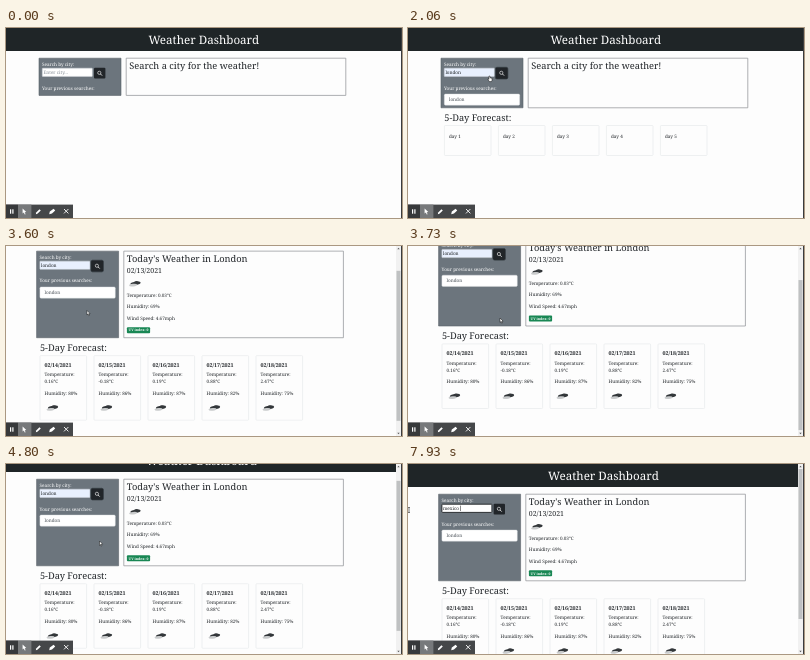
These frames come from a looping animation (396x190 px, 8 s). An HTML page with a canvas:

```html
<!DOCTYPE html>
<html lang="en">
<head>
<meta charset="utf-8">
<title>Weather Dashboard</title>
<style>
  html, body { margin: 0; width: 100%; height: 100%; overflow: hidden; background: #fdfdfd; }
  canvas { display: block; width: 396px; height: 190px; }
</style>
</head>
<body>
<canvas id="stage"></canvas>
<script>
const W = 396, H = 190, LOOP = 8000, STEP = 1000 / 15;
const INK = '#212529', SERIF = '"Noto Serif", serif', BODY = 4.64;
const canvas = document.getElementById('stage');
const ctx = canvas.getContext('2d');
const ratio = window.devicePixelRatio || 1;
canvas.width = W * ratio;
canvas.height = H * ratio;

const forecast = [
  ['02/14/2021', '0.16', 80], ['02/15/2021', '-0.18', 86], ['02/16/2021', '0.19', 87],
  ['02/17/2021', '0.88', 82], ['02/18/2021', '2.47', 75]
];

// time, x, y, shape from then on
const pointer = [
  [200, 180, 50, 'arrow'], [333, 44, 45, 'beam'], [1200, 44, 45, 'beam'],
  [1400, 52, 55, 'arrow'], [1660, 92, 46, 'hand'], [1800, 93, 42, 'hand'],
  [1866, 93, 42, 'hand'], [2000, 86, 46, 'hand'], [2066, 81, 48, 'hand'],
  [2200, 77, 50, 'arrow'], [2860, 64, 53, 'arrow'], [3400, 64, 53, 'arrow'],
  [3730, 92, 72, 'arrow'], [4200, 93.5, 77, 'arrow'], [4933, 93.5, 77, 'arrow'],
  [5266, 53, 44, 'beam'], [5733, 53, 44, 'beam'], [6133, 1, 46, 'beam']
];
const scrollKeys = [[3400, 0], [3533, 16], [3666, 34], [3730, 36.8], [4600, 36.8], [4800, 15], [4933, 0]];
const clicks = [[330, 400, 44, 45], [1795, 1995, 93, 42], [5525, 5730, 53, 44]];
const typing = [
  [0, ''], [660, 'l'], [860, 'lo'], [1395, 'london'], [6730, 'm'], [6860, 'me'],
  [7130, 'mex'], [7330, 'mexi'], [7530, 'mexic'], [7730, 'mexico'], [7930, 'mexico ']
];

const between = (t, a, b) => t >= a && t < b;

function lastKey(keys, t) {
  let i = 0;
  while (i < keys.length - 1 && keys[i + 1][0] <= t) i++;
  return i;
}

function tween(keys, t, field) {
  const i = lastKey(keys, t), a = keys[i], b = keys[i + 1];
  if (!b || t <= a[0]) return a[field];
  return a[field] + (b[field] - a[field]) * (t - a[0]) / (b[0] - a[0]);
}

function text(str, x, y, size = BODY, color = INK, weight = 400, align = 'left') {
  ctx.font = `${weight} ${size}px ${SERIF}`;
  ctx.textAlign = align;
  ctx.fillStyle = color;
  ctx.fillText(str, x, y);
}

function rect(x, y, w, h, color) {
  ctx.fillStyle = color;
  ctx.fillRect(x, y, w, h);
}

function box(x, y, w, h, r, fill, stroke, line = 0.6) {
  ctx.beginPath();
  ctx.roundRect(x, y, w, h, r);
  if (fill) { ctx.fillStyle = fill; ctx.fill(); }
  if (stroke) { ctx.strokeStyle = stroke; ctx.lineWidth = line; ctx.stroke(); }
}

function shape(points, fill, stroke, line = 0.6) {
  ctx.beginPath();
  points.forEach(([x, y]) => ctx.lineTo(x, y));
  ctx.closePath();
  if (fill) { ctx.fillStyle = fill; ctx.fill(); }
  if (stroke) { ctx.strokeStyle = stroke; ctx.lineWidth = line; ctx.stroke(); }
}

function stroke(points, color, line) {
  ctx.beginPath();
  for (let i = 0; i < points.length; i += 2) {
    ctx.moveTo(...points[i]);
    ctx.lineTo(...points[i + 1]);
  }
  ctx.strokeStyle = color;
  ctx.lineWidth = line;
  ctx.stroke();
}

function oval(x, y, rx, ry, color, turn = 0) {
  ctx.beginPath();
  ctx.ellipse(x, y, rx, ry, turn, 0, 7);
  ctx.fillStyle = color;
  ctx.fill();
}

function ring(x, y, r, color, line) {
  ctx.beginPath();
  ctx.arc(x, y, r, 0, 7);
  ctx.strokeStyle = color;
  ctx.lineWidth = line;
  ctx.stroke();
}

function cloud(x, y) {
  oval(x + 1.4, y - 0.6, 5.2, 1.7, '#33373a', -0.16);
  oval(x + 2.4, y - 1.4, 2.4, 1.6, '#33373a');
  oval(x - 1, y + 1.2, 4, 1.3, '#c9cbcc', -0.1);
}

function searchPanel(t, height) {
  box(33, 30.2, 82, height, 0, '#6c757d', '#5a6268');
  text('Search by city:', 36, 37.7, BODY, '#fff');

  const value = typing[lastKey(typing, t)][1];
  const focused = between(t, 330, 1660) || t >= 5525;
  const filled = between(t, 1395, 6725);
  box(36.3, 40.2, 50, 8.2, 0.5, filled ? '#e8f0fe' : '#fff', focused ? '#1b1f22' : '#ced4da', focused ? 0.9 : 0.5);
  if (t >= 5733 && filled) {
    const from = Math.min(53, Math.max(37.5, tween(pointer, t, 1) + ox(t) * -1));
    rect(from, 41.4, 53 - from, 5.8, '#8fb8f0');
  }
  text(value || 'Enter city...', 37.4, 46, BODY, value ? INK : '#868e96');
  if (focused && !filled) {
    const caret = 37.6 + (value ? ctx.measureText(value).width : 0);
    rect(caret, 41.6, 0.5, 5.4, '#111');
  }

  if (between(t, 1795, 5525)) box(87.4, 39.3, 12.4, 11.6, 1.5, '#15191c', '#3d454b', 1);
  box(88, 39.8, 11.4, 10.6, 1, INK);
  ring(93.3, 44.8, 1.6, '#fff', 0.6);
  stroke([[94.5, 46], [96.1, 47.6]], '#fff', 0.8);

  text('Your previous searches:', 36, 61.5, BODY, '#fff');
  if (t >= 1995) {
    box(36.3, 66, 75.4, 11.2, 1.2, '#fff', '#d5d9dc', 0.4);
    text('london', 41, 73.2, BODY, '#495057');
  }
}

function today(loaded, height) {
  box(120.2, 30.2, 219.6, height, 0, '#fdfdfd', '#8b8f92', 0.7);
  if (!loaded) {
    text('Search a city for the weather!', 123.2, 41.4, 9.28);
    return;
  }
  text("Today's Weather in London", 123.2, 41.4, 9.28);
  text('02/13/2021', 123.2, 52.4, 6.96);
  cloud(130.5, 63);
  text('Temperature: 0.03°C', 123.2, 75.6);
  text('Humidity: 69%', 123.2, 87.2);
  text('Wind Speed: 4.67mph', 123.2, 98.8);
  box(123.3, 106.3, 23.2, 5.9, 1, '#198754');
  text('UV index: 0', 134.9, 110.5, 3.48, '#fff', 700, 'center');
}

function days(loaded, y) {
  text('5-Day Forecast:', 36.3, y + 93, 9.28);
  forecast.forEach(([date, temp, humidity], i) => {
    const x = 36.4 + i * 54;
    box(x, y + 97.5, 46.6, loaded ? 64.6 : 30, 0.8, '#fdfdfd', '#dfe2e4', 0.5);
    if (!loaded) {
      text('day ' + (i + 1), x + 4.6, y + 109.8);
      return;
    }
    text(date, x + 4.6, y + 108.6, 5.35, INK, 700);
    text('Temperature:', x + 4.6, y + 118.2);
    text(temp + '°C', x + 4.6, y + 125.1);
    text(`Humidity: ${humidity}%`, x + 4.6, y + 136.6);
    cloud(x + 11.6, y + 150);
  });
}

function scrollbar(scroll) {
  rect(390, 0, 5, H, '#f1f1f1');
  rect(390.5, 5 + scroll * 0.79, 4, 150, '#bfc1c2');
  shape([[391.3, 3.2], [392.5, 1.8], [393.7, 3.2]], '#555');
  shape([[391.3, 186.8], [392.5, 188.2], [393.7, 186.8]], '#555');
}

function toolbar() {
  rect(0, 176.6, 67, 13.4, '#454749');
  rect(0, 176.6, 12, 13.4, '#37393b');
  rect(12, 176.6, 13.4, 13.4, '#77797b');
  rect(4, 181.3, 1.2, 4.4, '#fff');
  rect(6.3, 181.3, 1.2, 4.4, '#fff');
  shape([[16.6, 180.6], [16.6, 185.6], [17.8, 184.6], [18.8, 186.6], [19.6, 186.2], [18.7, 184.2], [20.3, 184]], '#fff');
  shape([[29.8, 186.2], [30.2, 184.6], [33.4, 181.2], [34.8, 182.5], [31.4, 185.8]], '#fff');
  shape([[43.2, 186.2], [43.8, 183.4], [47.6, 180.8], [49.2, 182.6], [46, 185.6]], '#fff');
  stroke([[58, 181], [62.4, 185.4], [62.4, 181], [58, 185.4]], '#fff', 0.9);
}

function cursor(t) {
  if (t < 200) return;
  const kind = pointer[lastKey(pointer, t)][3];
  ctx.save();
  ctx.translate(tween(pointer, t, 1), tween(pointer, t, 2));
  if (kind === 'beam') {
    stroke([[0, -2.3], [0, 2.3], [-1, -2.5], [1, -2.5], [-1, 2.5], [1, 2.5]], '#222', 0.6);
  } else if (kind === 'hand') {
    shape([[0, 0], [0.9, 0], [1.1, 1.8], [3.2, 2.4], [3, 4.6], [2.4, 5.6], [0.4, 5.6], [-1.2, 3.2], [-0.8, 2.7], [0, 3.4]], '#fff', '#111', 0.5);
  } else {
    shape([[0, 0], [0, 4.4], [1, 3.5], [1.7, 5.2], [2.4, 4.9], [1.7, 3.2], [3.1, 3.1]], '#fff', '#111', 0.5);
  }
  ctx.restore();
}

// the page narrows once its scrollbar appears
function ox(t) { return t >= 2195 ? -2.4 : 0; }

function draw(time) {
  const t = Math.floor((time + 7) / STEP) * STEP;
  const searched = t >= 1995, loaded = t >= 2195;
  const scroll = tween(scrollKeys, t, 1);
  const height = loaded ? 86.6 : searched ? 49.6 : 37.2;

  ctx.setTransform(ratio, 0, 0, ratio, 0, 0);
  ctx.textRendering = 'geometricPrecision';
  rect(0, 0, W, H, '#fdfdfd');

  ctx.save();
  ctx.translate(0, -scroll);
  rect(0, 0, W, 23, '#1f2527');
  ctx.translate(ox(t), 0);
  text('Weather Dashboard', 197.8, 16, 11.6, '#fff', 400, 'center');
  searchPanel(t, height);
  today(loaded, height);
  if (searched) days(loaded, loaded ? 37.2 : 0);
  ctx.restore();

  if (loaded) scrollbar(scroll);
  rect(395, 0, 1, H, '#3a3c3e');
  toolbar();
  for (const [from, to, x, y] of clicks) {
    if (between(t, from, to)) ring(x, y, 8.6, '#c4303a', 1.1);
  }
  cursor(t);
}

function tick(now) {
  draw(now % LOOP);
  requestAnimationFrame(tick);
}
draw(0);
requestAnimationFrame(tick);
</script>
</body>
</html>
```
